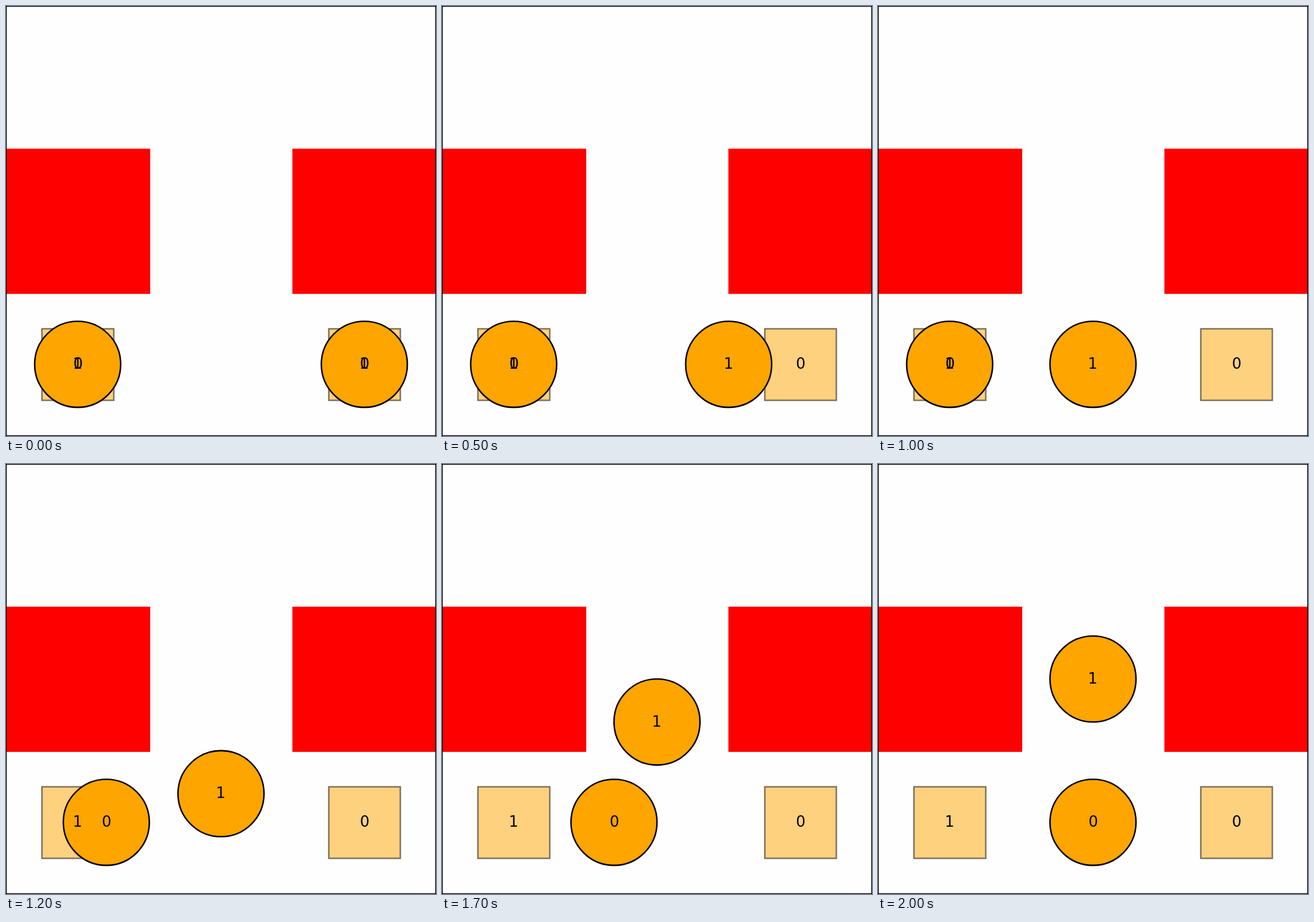
Write an HTML page that moves like this. It is 748x748 px and loops after 8000 ms.

```html
<!DOCTYPE html>
<html lang="en">
<head>
<meta charset="utf-8">
<title>Two agents on a grid</title>
<style>
  html, body { margin: 0; width: 100%; height: 100%; overflow: hidden; background: #fefefe; }
  svg { display: block; width: 100%; height: 100%; }
  .wall { fill: #f00; stroke: #f00; }
  .goal { fill: orange; stroke: #000; fill-opacity: .5; stroke-opacity: .5; }
  .agent { fill: orange; stroke: #000; }
  .border { fill: none; stroke: #000; }
  svg { stroke-width: 2.6; }
  text { font: 26px "DejaVu Sans", sans-serif; text-anchor: middle; }
</style>
</head>
<body>
<svg viewBox="0 0 748 748">
  <rect class="wall" x=".5" y="249.5" width="249" height="250"/>
  <rect class="wall" x="499.5" y="249.5" width="249" height="250"/>
  <rect class="border" width="748" height="748"/>
  <rect class="goal" x="62.5" y="561.5" width="125" height="124.5"/>
  <rect class="goal" x="561.5" y="561.5" width="124.5" height="124.5"/>
  <circle class="agent" r="74.8"/>
  <circle class="agent" r="74.8"/>
  <text>0</text>
  <text>1</text>
  <text>0</text>
  <text>1</text>
</svg>
<script>
const CELL = 748 / 3, LOOP = 8000, STEP = 100, STEPS_PER_CELL = 10;
const agents = document.querySelectorAll('.agent');
const [goalLabel0, goalLabel1, ...agentLabels] = document.querySelectorAll('text');
const center = cell => (cell + .5) * CELL;
const clamp = v => Math.min(1, Math.max(0, v));

function placeLabel(label, col, row) {
  const nudge = label.textContent === '0' ? .7 : -.3;
  label.setAttribute('x', Math.round((center(col) + nudge) * 2) / 2);
  label.setAttribute('y', Math.round(center(row) + 7.7));
}

function placeAgent(i, col, row) {
  agents[i].setAttribute('cx', center(col));
  agents[i].setAttribute('cy', center(row));
  placeLabel(agentLabels[i], col, row);
}

function draw() {
  const moved = Math.floor(performance.now() % LOOP / STEP) / STEPS_PER_CELL;
  const first = clamp(moved), second = clamp(moved - 1);
  placeAgent(0, second, 2);
  placeAgent(1, 2 - first, 2 - second);
  requestAnimationFrame(draw);
}

placeLabel(goalLabel0, 2, 2);
placeLabel(goalLabel1, 0, 2);
draw();
</script>
</body>
</html>
```
